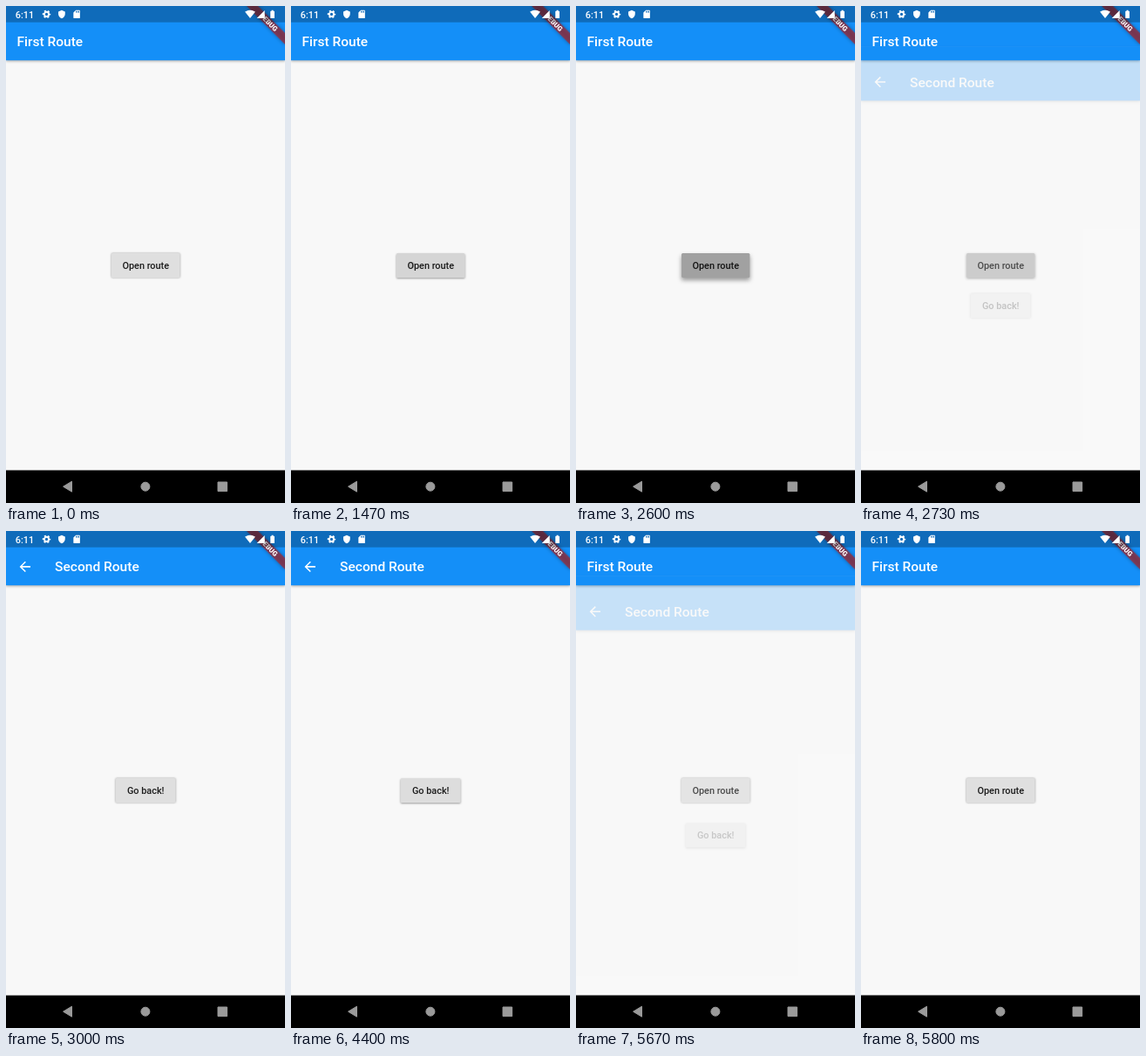
These frames come from a looping animation (320 px wide and 569 px high, 5.94 s). An HTML page:

```html
<!DOCTYPE html>
<html lang="en">
<head>
<meta charset="utf-8">
<title>Route navigation</title>
<style>
  html, body { margin: 0; width: 100%; height: 100%; overflow: hidden; background: #000; }
  svg { display: block; width: 100vw; height: 100vh; }
  text { font-family: Roboto, "Noto Sans", sans-serif; font-weight: 500; }
  .title { font-size: 15.56px; fill: #fff; }
  .label { font-size: 10.89px; fill: #000; fill-opacity: .88; text-anchor: middle; }
  .bar { fill: #148ff8; filter: drop-shadow(0 1.5px 1.6px rgba(0, 0, 0, .32)); }
</style>
</head>
<body>
<svg id="stage" viewBox="0 0 320 569" xmlns="http://www.w3.org/2000/svg"></svg>
<script>
const LOOP = 5940;
const VIEW_H = 531.7;
const BTN_TOP = 283, BTN_H = 28;

// Moments at which the screen is redrawn; the picture holds in between.
const TICKS = [
  0, 1470, 1600, 1670, 1740, 1800, 2000, 2130, 2200, 2330, 2400,
  2600, 2670, 2730, 2800, 2870, 3000, 4400, 4530, 4670, 4870,
  5000, 5130, 5200, 5330, 5400, 5530, 5670, 5740, 5800
];
const PUSH = 2604, POP = 5490, SLIDE_MS = 300;

const BUTTONS = [
  { id: 'open', text: 'Open route', x: 120.9, w: 78.6, tap: 139, down: 1416, up: 2630 },
  { id: 'back', text: 'Go back!', x: 125.7, w: 68.8, tap: 137.5, down: 4390, up: 5490 }
];

const ICONS = {
  arrow: 'M20 11H7.83l5.59-5.59L12 4l-8 8 8 8 1.41-1.41L7.83 13H20v-2z',
  shield: 'M12 1L3 5v6c0 5.55 3.84 10.74 9 12 5.16-1.26 9-6.45 9-12V5l-9-4z',
  card: 'M18 2h-8L4 8v12c0 1.1.9 2 2 2h12c1.1 0 2-.9 2-2V4c0-1.1-.9-2-2-2zm-6 6h-2V4h2v4zm3 0h-2V4h2v4zm3 0h-2V4h2v4z',
  wifi: 'M12 21.5L23.64 7c-.45-.34-4.93-4-11.64-4S.81 6.66.36 7z',
  signal: 'M2 22h20V2z',
  battery: 'M15.67 4H14V2h-4v2H8.33C7.6 4 7 4.6 7 5.33v15.33C7 21.4 7.6 22 8.33 22h7.33c.74 0 1.34-.6 1.34-1.33V5.33C17 4.6 16.4 4 15.67 4z'
};

const place = (cx, cy, k) => `transform="translate(${cx} ${cy}) scale(${k}) translate(-12 -12)"`;
const icon = (name, cx, cy, k) => `<path d="${ICONS[name]}" fill="#fff" ${place(cx, cy, k)}/>`;

const gear = (cx, cy, k) => `
  <g fill="none" stroke="#fff" ${place(cx, cy, k)}>
    <circle cx="12" cy="12" r="5.6" stroke-width="4.2"/>
    <circle cx="12" cy="12" r="8.6" stroke-width="3.4" pathLength="12"
      stroke-dasharray="1 1" stroke-dashoffset=".5"/>
  </g>`;

const button = b => {
  const box = `x="${b.x}" y="${BTN_TOP}" width="${b.w}" height="${BTN_H}" rx="1.5"`;
  return `
  <clipPath id="${b.id}-clip"><rect ${box}/></clipPath>
  <rect id="${b.id}-face" ${box} fill="#dfdfdf"/>
  <g clip-path="url(#${b.id}-clip)">
    <rect id="${b.id}-glow" ${box} opacity="0"/>
    <circle id="${b.id}-splash" cx="${b.tap}" cy="296.5" r="0" opacity="0"/>
  </g>
  <text class="label" x="160.2" y="300.9">${b.text}</text>`;
};

const page = (id, title, x, extra, b) => `
  <g id="${id}">
    <rect width="320" height="${VIEW_H}" fill="#f8f8f8"/>
    <rect class="bar" width="320" height="62.2"/>
    ${extra}
    <text class="title" x="${x}" y="46.4">${title}</text>
    ${button(b)}
  </g>`;

const banner = `
  <g transform="translate(320 0) rotate(45)">
    <rect x="-31.1" y="21.8" width="62.2" height="9.33" fill="#b71c1c" fill-opacity=".63"
      style="filter: drop-shadow(0 0 2px rgba(0, 0, 0, .5))"/>
    <text x="0" y="29.2" text-anchor="middle" fill="#fff"
      style="font-size: 7.93px; font-weight: 900">DEBUG</text>
  </g>`;

const system = `
  <rect width="320" height="18.67" fill-opacity=".25"/>
  <text x="10.8" y="13.6" fill="#fff" style="font-size: 10.89px">6:11</text>
  ${gear(46.5, 9.4, .46)}
  ${icon('shield', 63.9, 9.4, .43)}
  ${icon('card', 81.1, 9.4, .47)}
  ${icon('wifi', 280, 9.3, .5)}
  ${icon('signal', 292.2, 9.4, .45)}
  ${icon('battery', 305.6, 9.4, .47)}
  <rect y="${VIEW_H}" width="320" height="38"/>
  <g fill="#9a9a9a" stroke="#9a9a9a" stroke-linejoin="round">
    <path d="M75.5 544.2v12L65.6 550.2z"/>
    <circle cx="159.9" cy="550.2" r="5"/>
    <rect x="243" y="545" width="10.6" height="10.6"/>
  </g>`;

document.getElementById('stage').innerHTML =
  page('first', 'First Route', 12.4, '', BUTTONS[0]) +
  page('second', 'Second Route', 56, icon('arrow', 21.8, 40.9, .778), BUTTONS[1]) +
  banner + system;

const el = id => document.getElementById(id);
const clamp = v => Math.min(1, Math.max(0, v));

function bezier(x1, y1, x2, y2) {
  const at = (a, b, s) => 3 * (1 - s) * (1 - s) * s * a + 3 * (1 - s) * s * s * b + s * s * s;
  return x => {
    let lo = 0, hi = 1;
    for (let i = 0; i < 24; i++) {
      const mid = (lo + hi) / 2;
      if (at(x1, x2, mid) < x) lo = mid; else hi = mid;
    }
    return at(y1, y2, (lo + hi) / 2);
  };
}
const slideEase = bezier(.4, 0, .2, 1);
const fadeEase = bezier(.42, 0, 1, 1);

function drawButton(b, t) {
  const held = t - b.down;
  const left = 1 - clamp((t - b.up) / 200);
  const press = clamp(held / 200) * left;
  const reach = Math.hypot(b.x + b.w - b.tap, BTN_H / 2) + 1;
  el(b.id + '-glow').setAttribute('opacity', .165 * press);
  const splash = el(b.id + '-splash');
  splash.setAttribute('r', reach * clamp(held / 1000));
  splash.setAttribute('opacity', .135 * clamp(held / 75) * left);
  const dy = .9 + 2.1 * press, blur = .8 + 1.9 * press;
  el(b.id + '-face').style.filter = `drop-shadow(0 ${dy}px ${blur}px rgba(0, 0, 0, .38))`;
}

function draw(t) {
  const shown = t < POP ? clamp((t - PUSH) / SLIDE_MS) : 1 - clamp((t - POP) / SLIDE_MS);
  const second = el('second');
  second.setAttribute('transform', `translate(0 ${(1 - slideEase(shown)) * VIEW_H / 4})`);
  second.setAttribute('opacity', shown === 1 ? 1 : fadeEase(shown));
  second.setAttribute('visibility', shown > 0 ? 'visible' : 'hidden');
  BUTTONS.forEach(b => drawButton(b, t));
}

const start = performance.now();
let last = -1;
function frame() {
  const now = (performance.now() - start) % LOOP;
  const tick = TICKS.filter(v => v <= now).pop();
  if (tick !== last) draw(last = tick);
  requestAnimationFrame(frame);
}
frame();
</script>
</body>
</html>
```
